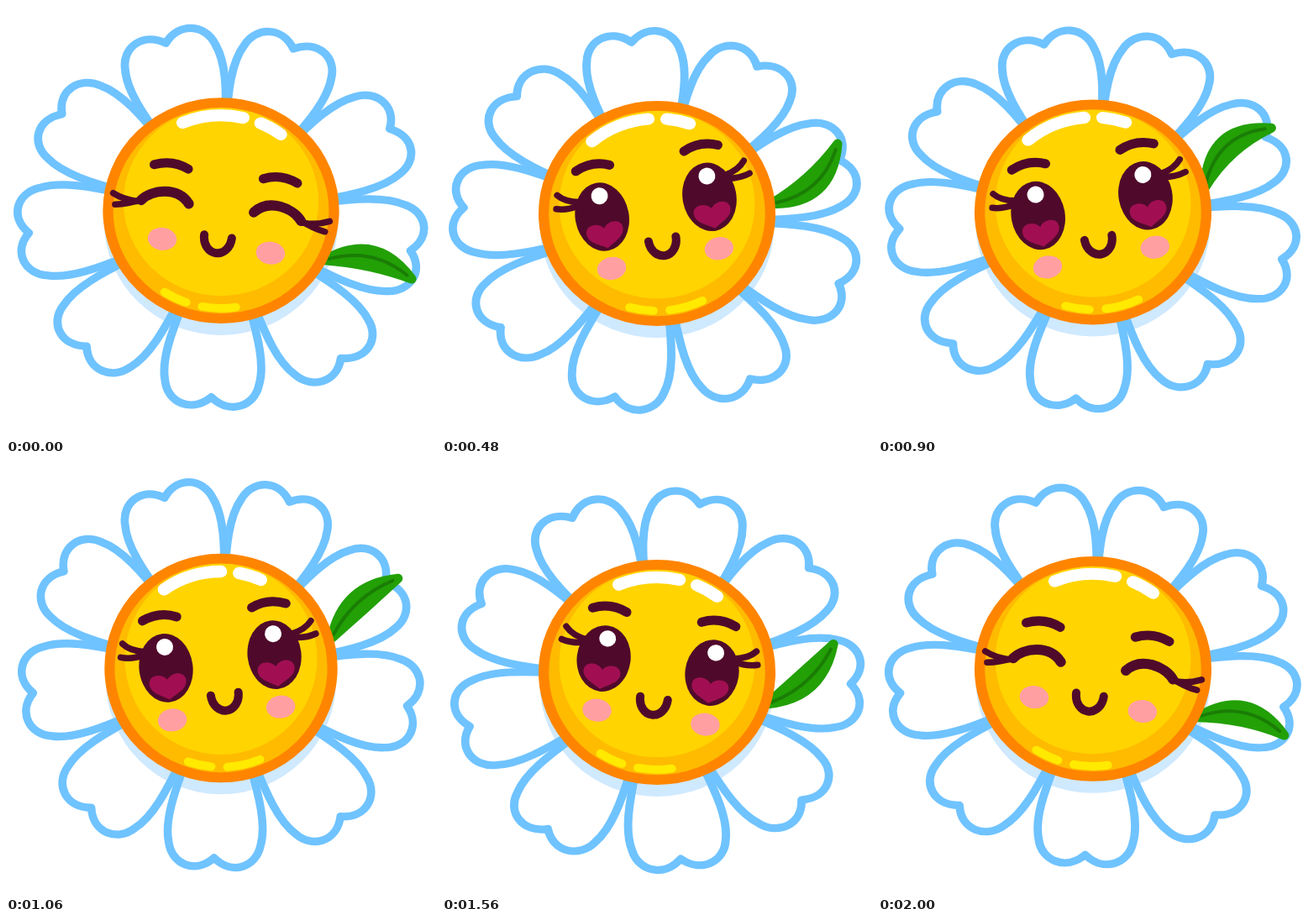
An HTML page that plays this animation: 512 by 512 pixels, repeating every 2020 ms.

```html
<!DOCTYPE html>
<html lang="en">
<head>
<meta charset="utf-8">
<title>Daisy</title>
<style>
  html, body { margin: 0; width: 100%; height: 100%; overflow: hidden; background: #fff; }
  svg { display: block; width: 100vw; height: 100vh; background: #fff; }
  .shadow { mix-blend-mode: darken; }
</style>
</head>
<body>
<svg id="stage" viewBox="0 0 512 512"></svg>
<script>
const LOOP = 2020, HALF = LOOP / 2;
const TAU = 2 * Math.PI, RAD = Math.PI / 180;
const DARK = '#4f0a2b', LEAF = '#22a006';
const stage = document.getElementById('stage');

function add(parent, tag, attrs = {}) {
  const el = document.createElementNS('http://www.w3.org/2000/svg', tag);
  set(el, attrs);
  parent.appendChild(el);
  return el;
}

function set(el, attrs) {
  for (const name in attrs) el.setAttribute(name, attrs[name]);
}

function line(parent, color, width, d = '') {
  return add(parent, 'path', {
    d, fill: 'none', stroke: color, 'stroke-width': width,
    'stroke-linecap': 'round', 'stroke-linejoin': 'round'
  });
}

const clamp = x => Math.min(1, Math.max(0, x));
const mix = (p, q, k) => p.map((v, i) => v + (q[i] - v) * k);
const polar = (x, y, angle, r) => [x + r * Math.sin(angle * RAD), y - r * Math.cos(angle * RAD)];

function smooth(from, to, x) {
  const u = clamp((x - from) / (to - from));
  return u * u * (3 - 2 * u);
}

// The second half of the loop mirrors the first: 1 leans right, -1 leans left.
const mirror = (t, progress) => (t < HALF ? 1 : -1) * (1 - 2 * progress);
const beat = t => t % HALF / HALF;
const wave = (t, peak) => Math.cos(TAU * (beat(t) - peak));

// A quick swing followed by a slow drift to the far side.
function spin(t) {
  const u = beat(t);
  return 2.3 + 20.5 * mirror(t, .7 * smooth(.04, .25, u) + .3 * u ** 2.5);
}

const lean = (t, span) => -1.5 + 9 * mirror(t, Math.sin(clamp(beat(t) / span) * Math.PI / 2));
const faceY = t => 245.5 + 3 * wave(t, .64);
const ringY = t => 253.5 + 4.5 * wave(t, .64);
const squash = t => .026 - .02 * Math.exp(-(((beat(t) - .07) / .05) ** 2));
const openness = t => smooth(170, 380, t) - smooth(1540, 1720, t);

const PETAL = 'M0 0L-38-110C-50-145-60-180-54-205C-50-231-22-243 0-222' +
  'C22-243 50-231 54-205C60-180 50-145 38-110Z';
const petals = [];
function addPetal(i) {
  petals[i] = add(stage, 'path', {
    d: PETAL, fill: '#fff', stroke: '#6fc3ff', 'stroke-width': 9.5, 'stroke-linejoin': 'round'
  });
}

// The leaf grows between petals 2 and 3.
for (let i = 4; i < 12; i++) addPetal(i % 9);
const leaf = add(stage, 'path', {
  fill: LEAF, stroke: LEAF, 'stroke-width': 11, 'stroke-linejoin': 'round'
});
const rib = line(stage, '#1a7d05', 4);
addPetal(3);

const shadow = add(stage, 'ellipse', { class: 'shadow', cx: 256, fill: '#cfe9ff' });

function arc(from, to, r) {
  return `M${polar(0, 0, from, r)}A${r} ${r} 0 0 ${to > from ? 1 : 0} ${polar(0, 0, to, r)}`;
}

const disc = add(stage, 'g');
add(disc, 'circle', { r: 131.5, fill: '#ffbb00' });
add(disc, 'ellipse', { cy: -11, rx: 113.5, ry: 115, fill: '#ffd400' });
add(disc, 'circle', { r: 131.5, fill: 'none', stroke: '#ff8500', 'stroke-width': 12 });
const shine = add(disc, 'g');
line(shine, '#fff', 14.5, arc(-30, 5.5, 116) + arc(16, 29.5, 116));
const glow = add(disc, 'g');
line(glow, '#ffea00', 10, arc(206, 192.5, 119) + arc(183.3, 164.2, 119));

const face = add(stage, 'g');
line(face, DARK, 10, 'M-16 31C-16 43-8 51 .5 51S17 43 17 31');

const sides = [-1, 1].map(side => {
  const half = add(face, 'g', { transform: `scale(${-side} 1)` });
  const brow = line(half, DARK, 11, 'M-86 2Q-65-7-45 2');
  const blush = add(half, 'ellipse', { cx: -65, rx: 17.3, ry: 13.5, fill: '#ff9fa2' });
  const eye = add(half, 'g', { transform: 'translate(-65 -8)' });
  const lashes = [line(eye, DARK, 7.5), line(eye, DARK, 7.5)];
  const ball = add(eye, 'ellipse', { rx: 32, fill: DARK });
  const lid = line(eye, DARK, 12, 'M-31 8C-20-6 10-14 26 5');
  const pupil = add(eye, 'g');
  add(pupil, 'path', {
    d: 'M0 38C-8 32-23 28-22 16C-21 6-6 5 0 14C6 5 21 6 22 16C23 28 8 32 0 38Z',
    fill: '#a10f52'
  });
  add(pupil, 'circle', { cx: -1.5 * side, cy: -25, r: 10, fill: '#fff' });
  return { brow, blush, lashes, ball, lid, pupil };
});

// Each lash runs tip, control, root; closed pose first, open pose second.
const LASHES = [
  [[-65, 4, -52, 10, -36, 10], [-48, -35, -40, -25, -22, -22]],
  [[-61, 17, -46, 15, -30, 7], [-52, -19, -40, -15, -24, -18]]
];

function drawPetals(t, s) {
  petals.forEach((petal, i) => {
    const angle = spin(t) + 40 * i;
    const lift = -2 * Math.sin(angle * RAD);
    set(petal, {
      transform: `translate(256 ${ringY(t)}) scale(${1 + 1.5 * s} ${1 - 1.3 * s}) rotate(${angle + lift})`
    });
  });
}

// The leaf droops while the flower leans right and bends with each swing.
function drawLeaf(t) {
  const droop = ((1 + Math.cos(TAU * t / LOOP)) / 2) ** 12;
  const heading = 48 + 54 * droop;
  const base = polar(256, faceY(t), spin(t) + 93, 136);
  const tip = polar(...base, heading, 107);
  const middle = mix(base, tip, .5);
  const bow = offset => polar(...middle, heading + 90, offset);
  const bend = 36 * wave(t, .39);
  set(leaf, { d: `M${base}Q${bow(bend - 20)} ${tip}Q${bow(bend + 20)} ${base}Z` });
  const spine = bow(bend);
  set(rib, { d: `M${mix(base, spine, .1)}Q${spine} ${mix(tip, spine, .12)}` });
}

function drawFace(t) {
  const open = openness(t);
  set(face, { transform: `translate(256 ${faceY(t)}) rotate(${lean(t, .4)})` });
  for (const s of sides) {
    set(s.brow, { transform: `translate(0 ${-46 - 23 * open})` });
    set(s.blush, { cy: 42.5 + 12 * open });
    s.lashes.forEach((lash, i) => {
      const p = mix(...LASHES[i], open * open);
      set(lash, { d: `M${p[0]} ${p[1]}Q${p.slice(2)}` });
    });
    set(s.ball, { ry: 41 * open });
    set(s.lid, {
      transform: `scale(${1 - .3 * open} 1)`,
      visibility: open < .6 ? 'visible' : 'hidden'
    });
    set(s.pupil, {
      transform: `scale(1 ${open})`,
      visibility: open > .08 ? 'visible' : 'hidden'
    });
  }
}

function draw(t) {
  const s = squash(t), y = faceY(t);
  drawPetals(t, s);
  drawLeaf(t);
  set(shadow, { cy: y + 14, rx: 136 * (1 + s), ry: 137.5 * (1 - s) });
  set(disc, { transform: `translate(256 ${y}) scale(${1 + s} ${1 - s})` });
  set(shine, { transform: `rotate(${lean(t, .28)})` });
  set(glow, { transform: `rotate(${lean(t, .4)})` });
  drawFace(t);
}

const began = performance.now();
function tick() {
  draw((performance.now() - began) % LOOP);
  requestAnimationFrame(tick);
}
tick();
</script>
</body>
</html>
```
